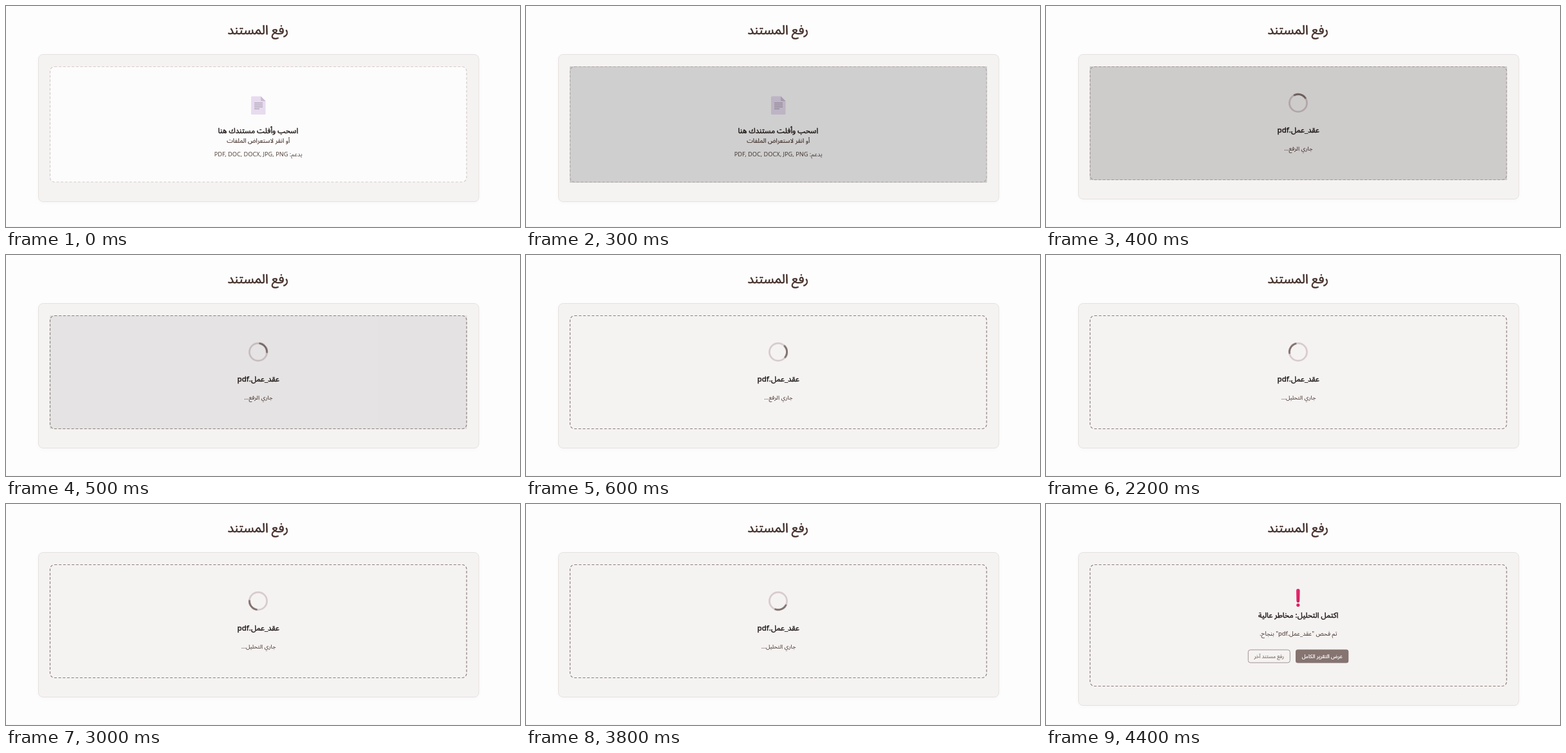
These frames come from a looping animation (799 by 344 pixels, 4500 ms). An HTML page:

```html
<!DOCTYPE html>
<html lang="ar">
<head>
<meta charset="utf-8">
<title>رفع المستند</title>
<style>
  html, body { margin: 0; width: 100%; height: 100%; overflow: hidden; background: #fdfdfd; }
  svg { display: block; width: 799px; height: 344px; }

  text {
    font-family: "Noto Sans", "Noto Sans Arabic", "DejaVu Sans", sans-serif;
    direction: rtl;
    text-anchor: middle;
    fill: #43302a;
  }
  /* a thin outline gives the semibold weight */
  .title { font-size: 19.9px; fill: #44302a; stroke: #44302a; stroke-width: .6px; }
  .strong { font-size: 11.6px; fill: #211a18; stroke: #211a18; stroke-width: .42px; }
  .sub { font-size: 9.65px; stroke: #43302a; stroke-width: .12px; }
  .formats { font-size: 9.2px; fill: #55463f; }
  .status { font-size: 9px; }
  .message { font-size: 9.3px; }
  .button { font-size: 8.2px; stroke-width: .22px; }
  .light { fill: #fff; stroke: #fff; }
  .dark { fill: #857470; stroke: #857470; }

  .card, .zone, .tap, .idle, .busy, .upload, .analyse, .done {
    animation: 4.5s step-end -1ms infinite;
  }
  .card { fill: #f5f3f2; stroke: #e4e0de; animation-name: card; }
  .zone { stroke-width: 1.2; stroke-dasharray: 4 2.67; animation-name: zone; }
  .tap { animation-name: tap; }
  .idle { animation-name: idle; }
  .busy { animation-name: busy; }
  .upload { animation-name: upload; }
  .analyse { animation-name: analyse; }
  .done { animation-name: done; }
  .arc { transform-origin: 392px 151px; animation: spin 4.5s -1ms infinite; }

  /* 0.4s: upload starts, 1.9s: analysis starts, 4.2s: result */
  @keyframes card {
    0% { height: 229px; }
    8.889% { height: 225px; }
    93.333%, 100% { height: 238px; }
  }
  @keyframes zone {
    0% { height: 179.5px; fill: #fcfcfc; stroke: #d8caca; }
    8.889% { height: 176px; fill: #fbf8f7; stroke: #c5b8b8; }
    11.111% { height: 176px; fill: #f7f5f5; stroke: #978a88; }
    13.333% { height: 176px; fill: #f5f3f2; stroke: #8c7e7b; }
    93.333%, 100% { height: 189px; fill: #f5f3f2; stroke: #8c7e7b; }
  }
  @keyframes tap {
    0% { opacity: 0; height: 181px; }
    6.667% { opacity: .18; height: 181px; }
    8.889% { opacity: .18; height: 177px; }
    11.111% { opacity: .075; height: 177px; }
    13.333%, 100% { opacity: 0; height: 177px; }
  }
  @keyframes idle { 0% { opacity: 1; } 8.889%, 100% { opacity: 0; } }
  @keyframes busy { 0% { opacity: 0; } 8.889% { opacity: 1; } 93.333%, 100% { opacity: 0; } }
  @keyframes upload { 0% { opacity: 1; } 42.222%, 100% { opacity: 0; } }
  @keyframes analyse { 0% { opacity: 0; } 42.222%, 100% { opacity: 1; } }
  @keyframes done { 0% { opacity: 0; } 93.333%, 100% { opacity: 1; } }

  /* one turn per second, 36deg each 100ms, then a stall */
  @keyframes spin {
    0% { transform: rotate(-129deg); animation-timing-function: steps(39); }
    86.666% { transform: rotate(1275deg); animation-timing-function: step-end; }
    86.667%, 100% { transform: rotate(171deg); animation-timing-function: step-end; }
  }
</style>
</head>
<body>
<svg viewBox="0 0 799 344">
  <defs>
    <linearGradient id="alert" x1="0" y1="0" x2="1" y2="1">
      <stop offset="0" stop-color="#ee2f74"/>
      <stop offset="1" stop-color="#c81b58"/>
    </linearGradient>
    <filter id="shade" x="-5%" y="-5%" width="110%" height="115%">
      <feDropShadow dx="0" dy="1.5" stdDeviation="2.5" flood-opacity=".025"/>
    </filter>
  </defs>

  <rect width="799" height="344" fill="#fdfdfd"/>
  <rect y="343" width="799" height="1" fill="#f5f5f5"/>
  <text class="title" x="391.8" y="44">رفع المستند</text>

  <rect class="card" x="50.5" y="75.5" width="684.5" height="229" rx="7" filter="url(#shade)"/>
  <rect class="zone" x="68.5" y="94.5" width="647.5" height="179.5" rx="7"/>

  <g class="idle">
    <path d="M382.5 140.5H396L403.5 148V167.5Q403.5 169 402 169H382.5Q381 169 381 167.5V142Q381 140.5 382.5 140.5Z" fill="#e7dcef"/>
    <path d="M396 140.5L403.5 148H397.5Q396 148 396 146.5Z" fill="#cbbbd6"/>
    <path d="M386 151H399M386 154H399M386 157H399M386 160H394" stroke="#988aa2" stroke-width="1.2"/>
    <text class="strong" x="391.8" y="197.5">اسحب وأفلت مستندك هنا</text>
    <text class="sub" x="392.2" y="213.3">أو انقر لاستعراض الملفات</text>
    <text class="formats" x="392.2" y="234.3">يدعم: PDF, DOC, DOCX, JPG, PNG</text>
  </g>

  <g class="busy">
    <g fill="none" stroke-width="2.8">
      <circle cx="392" cy="151" r="13.6" stroke="#d8cccd"/>
      <path class="arc" d="M382.383 141.383A13.6 13.6 0 0 1 401.617 141.383" stroke="#7d6d6a"/>
    </g>
    <text class="strong" x="392.2" y="196.7">عقد_عمل.pdf</text>
    <text class="status upload" x="392.4" y="224.7">جاري الرفع...</text>
    <text class="status analyse" x="392.6" y="224.7">جاري التحليل...</text>
  </g>

  <g class="done">
    <path d="M389 135Q389 132 391.8 132T394.6 135L394.2 151Q394 153.5 391.8 153.5T389.4 151Z" fill="url(#alert)"/>
    <circle cx="391.8" cy="157.3" r="2.6" fill="url(#alert)"/>
    <text class="strong" x="392.3" y="177.3">اكتمل التحليل: مخاطر عالية</text>
    <text class="message" x="392.3" y="205.4">تم فحص "عقد_عمل.pdf" بنجاح.</text>
    <rect x="388" y="226.5" width="82.3" height="21" rx="3.5" fill="#857470"/>
    <text class="button light" x="429.3" y="240">عرض التقرير الكامل</text>
    <rect x="314.3" y="227" width="65" height="20" rx="3.5" fill="none" stroke="#a09390"/>
    <text class="button dark" x="346.7" y="240">رفع مستند آخر</text>
  </g>

  <rect class="tap" x="68" y="94" width="648.5" height="181"/>
</svg>
</body>
</html>
```
